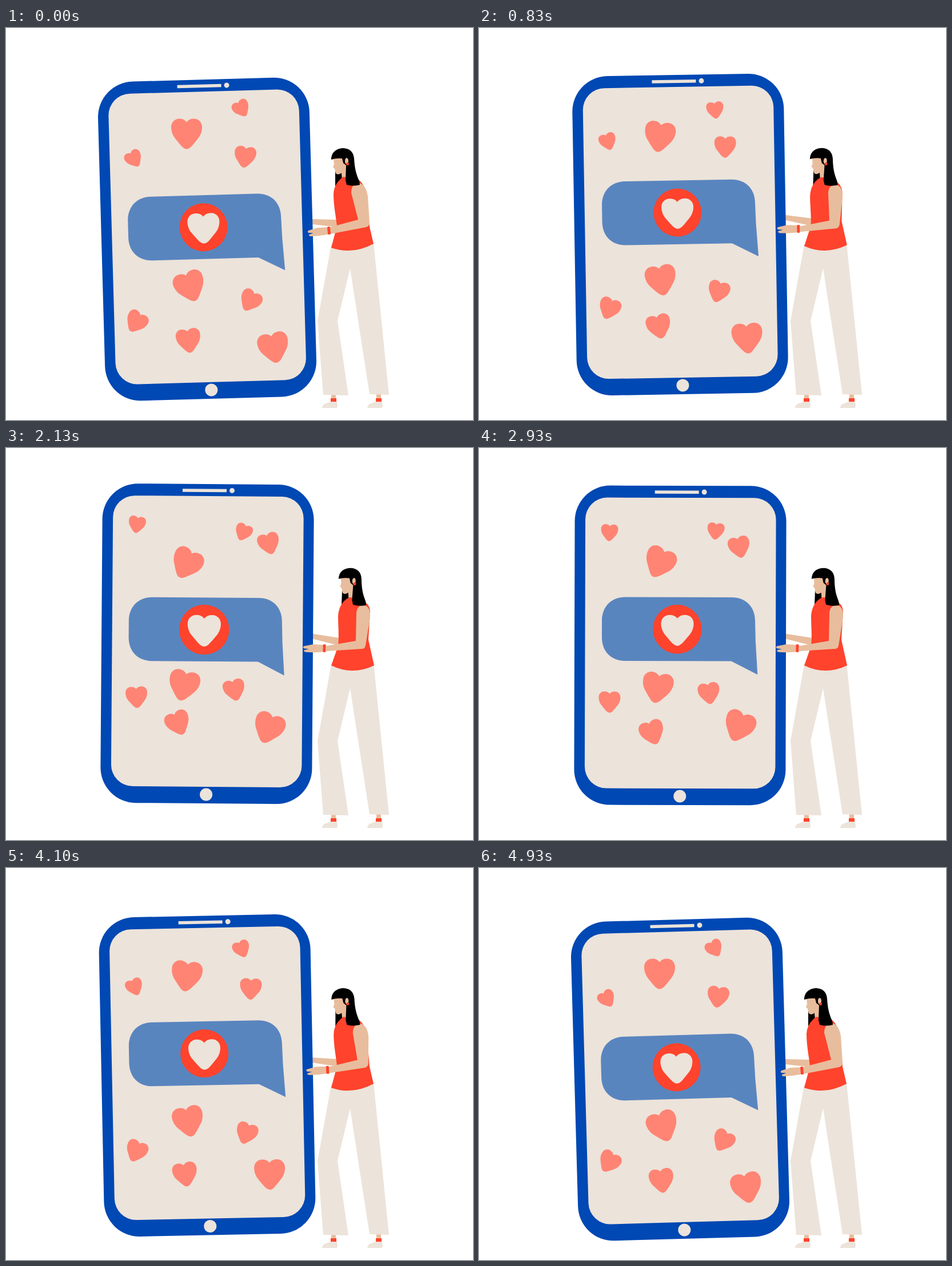
Write an HTML page that moves like this. It is 817 px wide and 685 px high and loops after 5010 ms.

```html
<!DOCTYPE html>
<html lang="en">
<head>
<meta charset="utf-8">
<title>Hearts on a phone</title>
<style>
html, body { margin: 0; width: 100%; height: 100%; overflow: hidden; background: #fff; }
svg { display: block; width: 100%; height: 100%; }
.blue { fill: #0048b3; }
.cream { fill: #ece3da; }
.bubble { fill: #5985bf; }
.red { fill: #ff432c; }
.pink { fill: #ff8474; }
.skin { fill: #e8bd9d; }
</style>
</head>
<body>
<svg viewBox="0 0 817 685">
  <defs>
    <path id="heart" d="M0-38C-6-46-14-49-24-49C-39-49-50-37-50-22C-50-5-43 8-36 16C-28 26-20 36-13 43Q0 55 13 43C20 36 28 26 36 16C43 8 50-5 50-22C50-37 39-49 24-49C14-49 6-46 0-38Z"/>
  </defs>

  <path id="farArm" class="skin" d="M520 333L536 334L580 335V348L536 343L520 342Z"/>

  <g id="phone">
    <rect class="blue" x="-185" y="-279" width="370" height="558" rx="62"/>
    <rect class="cream" x="-166.5" y="-258" width="333.5" height="508" rx="38"/>
    <rect class="cream" x="-45" y="-270.5" width="77" height="5.5"/>
    <circle class="cream" cx="41.5" cy="-268" r="4.5"/>
    <circle class="cream" cx="0" cy="263.5" r="11"/>
  </g>
  <g id="hearts" class="pink"></g>
  <g id="tilted">
    <g id="bubble">
      <path class="bubble" d="M-132-14C-132-39-116-56-91-56H95C120-56 136-39 136-15L137 22L140.5 79L94.5 55.5H-91C-116 55.5-132 39-132 14Z"/>
      <g id="badge">
        <circle class="red" r="42"/>
        <use href="#heart" class="cream" transform="translate(0 2) scale(.56 .54)"/>
      </g>
    </g>
  </g>

  <g id="legs">
    <path class="skin" d="M569 640h8v8h-8ZM648 640h8v8h-8Z"/>
    <path class="red" d="M568 647h10v7h-10ZM647 647h10v7h-10Z"/>
    <path id="shoe" class="cream" d="M568 653L557 657Q553 660 553 664H577Q580 664 580 660L579 653Z"/>
    <use href="#shoe" x="79"/>
    <path class="cream" d="M569 378L545 512L555 641L599 642L580 512L602 420L636 640L670 641L643 375Z"/>
  </g>

  <g id="neck">
    <path d="M576 248V277Q585 273 589 262V248Z"/>
    <path class="skin" d="M586 244H598V265H588Z"/>
  </g>
  <path id="torso" class="red"/>
  <path id="arm" class="skin"/>
  <g id="hand">
    <path class="skin" d="M567 348L545 349L529 354Q526 357 530 358L538 358L530 361Q529 364 534 364L548 363L567 360Z"/>
    <path class="red" d="M562 348Q565 346 567 348L568 360Q565 362 563 360Z"/>
  </g>
  <g id="head">
    <path class="skin" d="M573 228L574 238L572 243L575 246L577 254Q580 257 584 255L591 251L598 240L596 227Z"/>
    <path d="M569 230C569 217 578 210 591 210C603 211 608 218 609 228C610 246 613 256 617 265Q619 270 619 274Q607 277 596 274L594 266L595 240L590 236L588 228Q578 227 569 230Z"/>
    <ellipse class="skin" cx="596" cy="232.5" rx="3" ry="5.5"/>
    <circle class="red" cx="597.5" cy="237.5" r="2.5"/>
  </g>
</svg>
<script>
const LOOP = 5010, STEPS = 99, TAU = 2 * Math.PI;
const $ = id => document.getElementById(id);
const lerp = (a, b, w) => a + (b - a) * w;

// There and back once per loop; a larger lead turns earlier.
const swing = (u, lead = .02) => (1 - Math.cos(TAU * (u + lead * Math.sin(Math.PI * u)))) / 2;

// Smooth ramp from 0 to 1 between two moments.
function ramp(u, from, to) {
  const v = Math.min(1, Math.max(0, (u - from) / (to - from)));
  return v * v * (3 - 2 * v);
}

function place(el, x, y, angle = 0, scale = 1) {
  el.setAttribute("transform", `translate(${x} ${y}) rotate(${angle}) scale(${scale})`);
}

// Moves a part by (x, y) while it turns about a joint.
function bend(id, w, x, y, angle, joint) {
  $(id).setAttribute("transform", `translate(${x * w} ${y * w}) rotate(${angle * w} ${joint})`);
}

// Each heart swings between two poses [x, y, angle]; sway bows its path sideways.
function heart(size, from, to, lead, sway = 0) {
  const el = document.createElementNS("http://www.w3.org/2000/svg", "use");
  el.setAttribute("href", "#heart");
  $("hearts").append(el);
  return u => {
    const [x, y, angle] = from.map((a, i) => lerp(a, to[i], swing(u, lead)));
    place(el, x + sway * Math.sin(TAU * u), y, angle, size / 100);
  };
}

const hearts = [
  heart(54, [316, 185, 0], [315.5, 203, 28]),
  heart(30, [224, 229, -32], [229, 133, 10], .035),
  heart(30, [412, 141, -30], [415, 147.5, 24], .1),
  heart(38, [418, 225.5, 8], [461, 166, -16]),
  heart(54, [322, 452, -20], [310.5, 414.5, 14]),
  heart(38, [427, 477, 30], [399, 422, -14]),
  heart(38, [227.5, 514, 32], [228.5, 434, -4]),
  heart(43, [319.5, 546.5, -8], [300, 481, -23], .075, 3),
  heart(54, [468.5, 559, -12], [456.5, 483.5, 24], -.03, 4)
];

// Outlines that change shape: leaning in, then upright.
const TORSO = [
  "M590 260C582 266 574 274 573 290C573 310 577 328 579 346L569 384Q606 397 643 377L636 347L631 290Q626 272 618 266L602 262Z",
  "M601 261C590 266 582 276 581 295C581 310 583 328 581 346L569 380Q606 398 644 380L634 335L637 285Q636 272 624 267L616 262Z"
];
const ARM = [
  "M604 288C604 276 610 271 617 271C626 272 631 281 633 294L636 340Q636 346 630 348L567 360L567 348L616 335Z",
  "M613 288C614 278 620 274 627 275C634 276 638 284 637 296L629 345Q628 351 622 351L560 355L560 346L612 337Z"
];

function morph(id, [a, b], w) {
  const to = b.match(/[\d.]+/g);
  let i = 0;
  $(id).setAttribute("d", a.replace(/[\d.]+/g, n => lerp(+n, +to[i++], w).toFixed(2)));
}

function draw(ms) {
  // Two pictures per 100 ms, held for 30 and 70 ms.
  const t = ms % LOOP;
  const step = Math.floor(t / 100) * 2 + (t % 100 >= 30 ? 1 : 0);
  const u = Math.min(step, STEPS) / STEPS;

  const pose = [352, 369 - 27.5 * swing(u), -1.6 + 2.05 * swing(u, .03)];
  place($("phone"), ...pose);
  place($("tilted"), ...pose);

  const bob = Math.cos(2 * TAU * u);
  place($("bubble"), -4.7 - 1.1 * bob, -32.3 + 11.3 * bob);
  place($("badge"), 0, 0, 0, 1 + .06 * swing(u) * Math.max(0, bob));

  for (const move of hearts) move(u);

  const rise = ramp(u, 0, .25);
  const lean = rise - ramp(u, .6, .855);
  const reach = rise - ramp(u, .6, .96);
  morph("torso", TORSO, lean);
  morph("arm", ARM, reach);
  bend("hand", reach, -8, -4, 6, "565 354");
  bend("farArm", reach, 3, -3, 7.5, "580 341");
  bend("head", lean, 11, 0, 2.3, "600 275");
  bend("neck", lean, 11, 0, 2.3, "600 275");
}

const start = performance.now();
function tick() {
  draw(performance.now() - start);
  requestAnimationFrame(tick);
}
tick();
</script>
</body>
</html>
```
